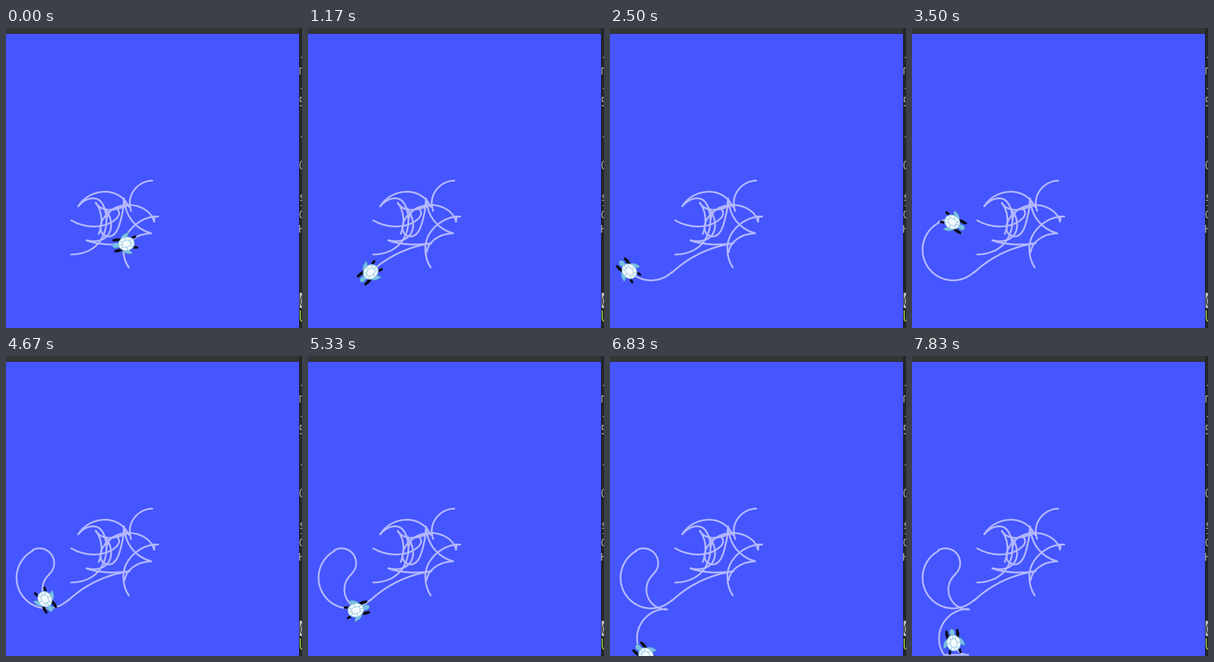
Write an HTML page that moves like this. It is 504x510 px and loops after 8 s.

```html
<!DOCTYPE html>
<html lang="en">
<head>
<meta charset="utf-8">
<title>Turtle trail</title>
<style>
  html, body { margin: 0; width: 100%; height: 100%; overflow: hidden; background: #4556ff; }
  svg { display: block; width: 504px; height: 510px; }
  .trail { fill: none; stroke: #b3b8ff; stroke-width: 3; stroke-linecap: round; stroke-linejoin: round; }
  .scraps { fill: none; stroke: #a9adab; stroke-width: 1.6; }
  .skin { fill: #78bfe6; stroke: #4d97bd; stroke-width: .8; }
  .claw { fill: #0b0e18; }
  .shell { fill: #f2faff; stroke: #8fc3de; stroke-width: 1.2; }
  .plates { fill: none; stroke: #8fc3de; stroke-width: 1.1; }
</style>
</head>
<body>
<svg viewBox="0 0 504 510">
  <rect width="504" height="510" fill="#4556ff"/>

  <g class="trail">
    <path d="M249 259.500C225 260 204 283 213 311"/>
    <path d="M123 303C142 272 193 268 209 304"/>
    <path d="M123 303C138 286 157 285 165 300C171 312 172 327 170 339C167 354 159 369 142 378C132 383 122 385 111 385"/>
    <path d="M111 327C137 342 171 341 189 323C195 316 193 309 187 307C177 307 174 316 171 325"/>
    <path d="M153 297C163 311 166 330 158 350"/>
    <path d="M153 298C164 313 182 312 211 300"/>
    <path d="M252 329C247 309 224 299 203 301C181 303 163 321 161 337C160 352 170 355 178 354C191 351 195 329 199 311L201 290"/>
    <path d="M252 329L253 322M248 320.500H259"/>
    <path d="M201 290C203 319 219 341 247 349"/>
    <path d="M247 349C221 350 204 365 202 381"/>
    <path d="M259 320.500C230 320 203 343 200 370C199 386 202 397 209 407"/>
    <path d="M137 361C149 366 178 371 210 366"/>
    <path d="M137 361C160 366 178 357 179 336C179 322 174 315 168 306"/>
    <polyline id="path"/>
  </g>

  <g id="turtle">
    <g id="side">
      <path class="claw" d="M-11 -22L-7.500 -21L-6 -9L-10.500 -7L-12 -14Z"/>
      <path class="claw" d="M-10 11L-6 14L-8 20L-11.500 19Z"/>
      <path class="skin" d="M-10 -7C-16 -5 -18 2 -18.500 8C-14 7 -11 4 -9 1Z"/>
    </g>
    <use href="#side" transform="scale(-1 1)"/>
    <path class="skin" d="M-3 -11L-4.500 -18Q-3 -23 0 -23Q3 -23 4.500 -18L3 -11Z"/>
    <ellipse class="shell" cy="1" rx="11.500" ry="13.500"/>
    <path class="plates" d="M-4 -6H4L6 1L4 8H-4L-6 1ZM-4 -6L-7 -10M4 -6L7 -10M6 1H11M-6 1H-11M4 8L7 12M-4 8L-7 12M0 -6V-12M0 8V14"/>
  </g>

  <rect width="504" height="9.500" fill="#333536"/>
  <rect y="9" width="504" height="1" fill="#292b33"/>
  <rect x="499" width="5" height="510" fill="#232627"/>
  <rect x="499" y="9" width="1" height="501" fill="#17191d"/>
  <g class="scraps">
    <path d="M502 50H504M504 68H500.500V79M502 103H504M504 118H501V125H504M500 132H504M502 185H504"/>
    <path d="M504 226Q500.500 227 500.500 233Q500.500 239 504 240M504 283Q500 285 504 289M500.500 293H504M502 302H504"/>
    <path d="M504 311Q500.500 312 500.500 317Q500.500 322 504 323M500 335V348M500 341H504"/>
  </g>
  <rect x="500" y="450" width="4" height="26" fill="#b8bbb8"/>
  <path d="M504 456Q501.500 459 501.500 464Q501.500 470 504 472" fill="none" stroke="#232627" stroke-width="1.600"/>
  <path d="M501 480V492Q501 498 504 498" fill="none" stroke="#a6d83c" stroke-width="1.800"/>
</svg>

<script>
  const FLOOR = 508, LOOP = 8000, RATE = 6;

  // Circular legs: centre, radius, side the head faces, then [seconds, degrees] keys.
  const legs = [
    { x: 236.7, y: 556.1, r: 192, face: -90, keys: [[0, 260.2], [.1, 262], [1.17, 227]] },
    { x: 70, y: 377, r: 52, face: 90, keys: [[1.17, 47], [2.33, 119], [2.5, 136.5], [2.83, 203], [3, 203], [3.29, 241.5]] },
    { x: 57, y: 352, r: 25, face: 90, keys: [[3.29, 241.5], [3.5, 300], [4.08, 409]] },
    { x: 96, y: 397, r: 34, face: -90, keys: [[4.08, 229], [4.67, 149], [5.09, 88]] },
    { x: 96, y: 480, r: 50, face: 90, keys: [[5.09, 268], [6, 216.6], [6.5, 164], [7.35, 90]] },
    { x: 95.5, y: 483, r: 25, face: 90, keys: [[7.35, 90], [7.83, 171]] }
  ];

  const path = document.getElementById('path');
  const turtle = document.getElementById('turtle');

  function pointOn(leg, deg) {
    const a = deg * Math.PI / 180;
    return [leg.x + leg.r * Math.cos(a), Math.min(FLOOR, leg.y + leg.r * Math.sin(a))];
  }

  function walk(t) {
    const points = [];
    let heading = 0;
    for (const leg of legs) {
      for (let i = 1; i < leg.keys.length; i++) {
        const [t0, a0] = leg.keys[i - 1], [t1, a1] = leg.keys[i];
        if (t < t0) return { points, heading };
        const end = a0 + (a1 - a0) * Math.min(1, (t - t0) / (t1 - t0));
        const n = Math.max(1, Math.ceil(Math.abs(end - a0) / 2));
        for (let k = 0; k <= n; k++) points.push(pointOn(leg, a0 + (end - a0) * k / n));
        heading = end + leg.face;
      }
    }
    return { points, heading };
  }

  function draw() {
    const ms = performance.now() % LOOP;
    const step = Math.min(47, Math.floor((ms + 4) * RATE / 1000));
    const { points, heading } = walk(step / RATE);
    const [x, y] = points[points.length - 1];
    path.setAttribute('points', points.map(p => p.map(v => v.toFixed(2))).join(' '));
    turtle.setAttribute('transform', `translate(${x} ${y}) rotate(${heading + 90})`);
    requestAnimationFrame(draw);
  }
  draw();
</script>
</body>
</html>
```
